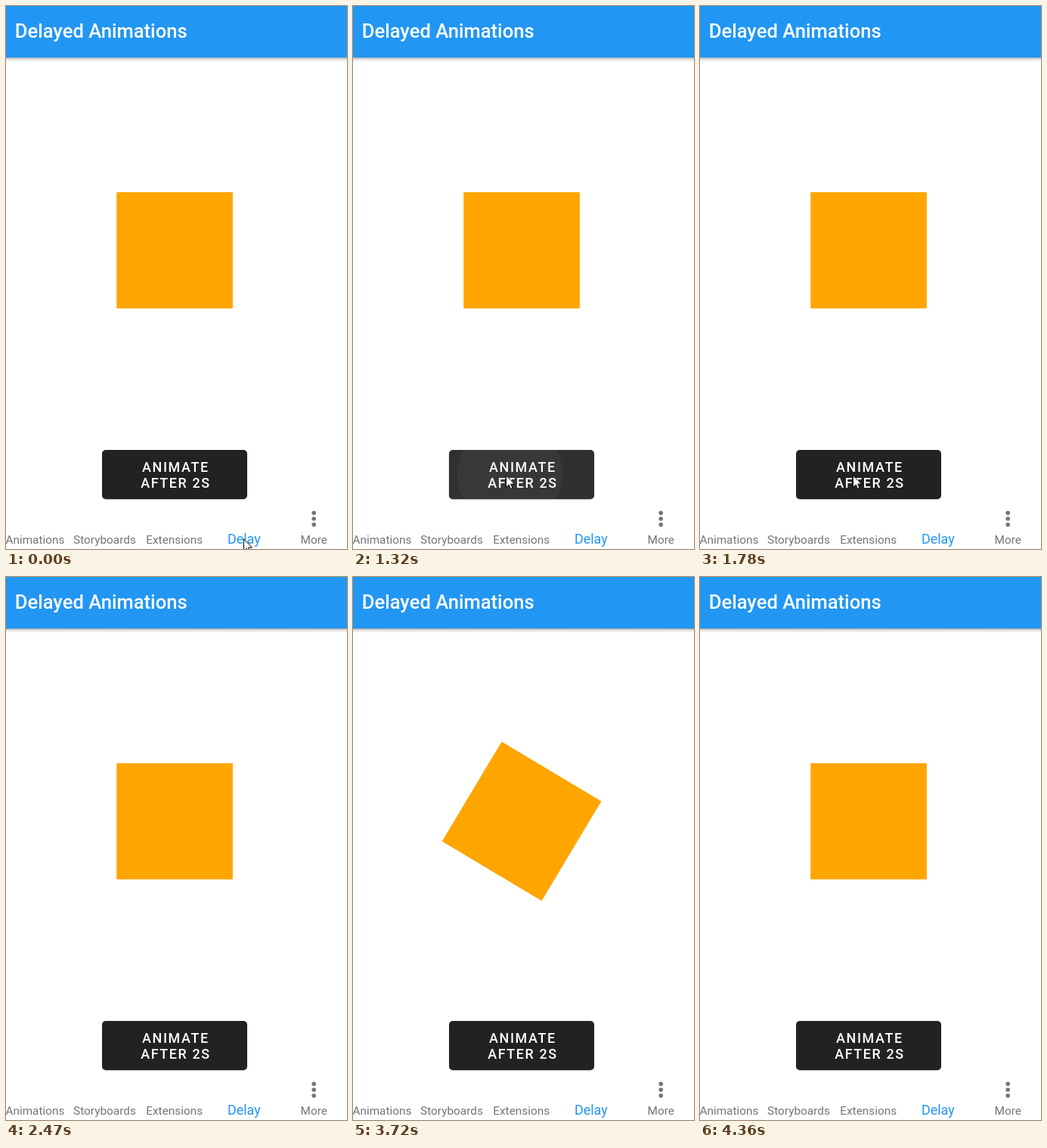
Animation of 451x718 px, one loop 5.06 s. Source, as an HTML page:

```html
<!DOCTYPE html>
<html lang="en">
<head>
<meta charset="utf-8">
<title>Delayed Animations</title>
<style>
  html, body { margin: 0; width: 100%; height: 100%; overflow: hidden; background: #fff; }
  svg { display: block; width: 100vw; height: 100vh; font-family: Roboto, sans-serif; }
  .title { font-size: 25.6px; font-weight: 500; fill: #fff; }
  .label { font-size: 17.92px; font-weight: 500; letter-spacing: .0893em; fill: #fff; text-anchor: middle; }
  .tabs { font-size: 15.36px; fill: #757575; text-anchor: middle; }
  .tabs .active { font-size: 17.92px; fill: #2196f3; }
</style>
</head>
<body>
<svg viewBox="0 0 451 718">
  <defs>
    <linearGradient id="shade" x2="0" y2="1">
      <stop offset="0" stop-color="#000" stop-opacity=".34"/>
      <stop offset=".4" stop-color="#000" stop-opacity=".12"/>
      <stop offset="1" stop-color="#000" stop-opacity="0"/>
    </linearGradient>
    <clipPath id="buttonClip"><rect x="127" y="587" width="192" height="65" rx="5"/></clipPath>
  </defs>

  <rect y="68" width="451" height="6" fill="url(#shade)"/>
  <rect width="451" height="68" fill="#2196f3"/>
  <text class="title" x="11.7" y="42">Delayed Animations</text>

  <rect id="box" x="146.3" y="246.2" width="153.6" height="153.6" fill="#ffa500"/>

  <rect id="lift" x="125.5" y="587" width="195" height="65.5" rx="6" opacity="0"/>
  <rect x="127" y="588" width="192" height="65" rx="5" opacity=".2"/>
  <g clip-path="url(#buttonClip)">
    <rect x="127" y="587" width="192" height="65" fill="#222"/>
    <g id="press" fill="#fff" opacity="0">
      <rect x="127" y="587" width="192" height="65" opacity=".2"/>
      <circle id="ripple" cy="619.5" opacity=".135"/>
    </g>
  </g>
  <text class="label" x="224.4" y="616">ANIMATE</text>
  <text class="label" x="224.4" y="637">AFTER 2S</text>

  <g class="tabs">
    <text x="38.4" y="711">Animations</text>
    <text x="130.5" y="711">Storyboards</text>
    <text x="222.7" y="711">Extensions</text>
    <text class="active" x="314.8" y="711">Delay</text>
    <text x="407.2" y="711">More</text>
    <circle cx="407.2" cy="670.3" r="2.8"/>
    <circle cx="407.2" cy="678" r="2.8"/>
    <circle cx="407.2" cy="685.7" r="2.8"/>
  </g>

  <circle id="click" cx="202" cy="620" r="15" fill="#fff200" fill-opacity=".58"/>
  <path id="cursor" d="M.5 .8V16.5L4.2 13 6.6 18.6 9 17.6 6.6 12.1H11.6Z" fill="#fff" stroke="#000"/>
</svg>
<script>
  const LOOP = 5060;
  const TAB = [314, 704], BUTTON = [202, 620], EXIT = [364, 708];
  const $ = id => document.getElementById(id);
  const mix = (a, b, k) => a + (b - a) * k;
  const smooth = k => k * k * (3 - 2 * k);
  const cubicInOut = k => k < .5 ? 4 * k ** 3 : 1 - 4 * (1 - k) ** 3;

  // Number of steps (0 to count) taken by time t, the first at start and the last at end.
  const stepsTaken = (t, start, end, count) => t < start ? 0
    : Math.min(count, 1 + Math.floor((t - start) / (end - start) * (count - 1) + 1e-6));

  function drawCursor(t) {
    const arrive = stepsTaken(t, 460, 770, 5);
    const leave = stepsTaken(t, 2160, 2470, 5);
    const [from, to, k] = leave ? [BUTTON, EXIT, leave / 4] : [TAB, BUTTON, arrive / 5];
    const [x, y] = from.map((v, i) => mix(v, to[i], smooth(Math.min(k, 1))));
    $('cursor').setAttribute('transform', `translate(${x} ${y})`);
    $('cursor').style.display = leave === 5 ? 'none' : '';
    $('click').style.display = t >= 920 && t < 1090 ? '' : 'none';
  }

  function drawRipple(t) {
    const step = stepsTaken(t, 1320, 1780, 7);
    const grow = 1 - (1 - Math.min(step / 5, 1)) ** 1.4;
    const strength = step < 3 ? step / 3 : Math.min(1, (7 - step) / 3);
    $('ripple').setAttribute('cx', mix(202, 223, grow));
    $('ripple').setAttribute('r', mix(58, 101.6, grow));
    $('press').setAttribute('opacity', strength);
    $('lift').setAttribute('opacity', strength * .15);
  }

  function drawBox(t) {
    const step = stepsTaken(t, 3470, 4360, 12);
    const sampled = 3470 + (step - 1) * 890 / 11;
    const k = step === 0 ? 0 : step === 12 ? 1 : (sampled - 3432) / 1010;
    $('box').setAttribute('transform', `rotate(${360 * cubicInOut(k)} 223.1 323)`);
  }

  function render(now) {
    const t = now % LOOP;
    drawCursor(t);
    drawRipple(t);
    drawBox(t);
  }

  let origin;
  function tick(now) {
    origin ??= now;
    render(now - origin);
    requestAnimationFrame(tick);
  }
  render(0);
  requestAnimationFrame(tick);
</script>
</body>
</html>
```
